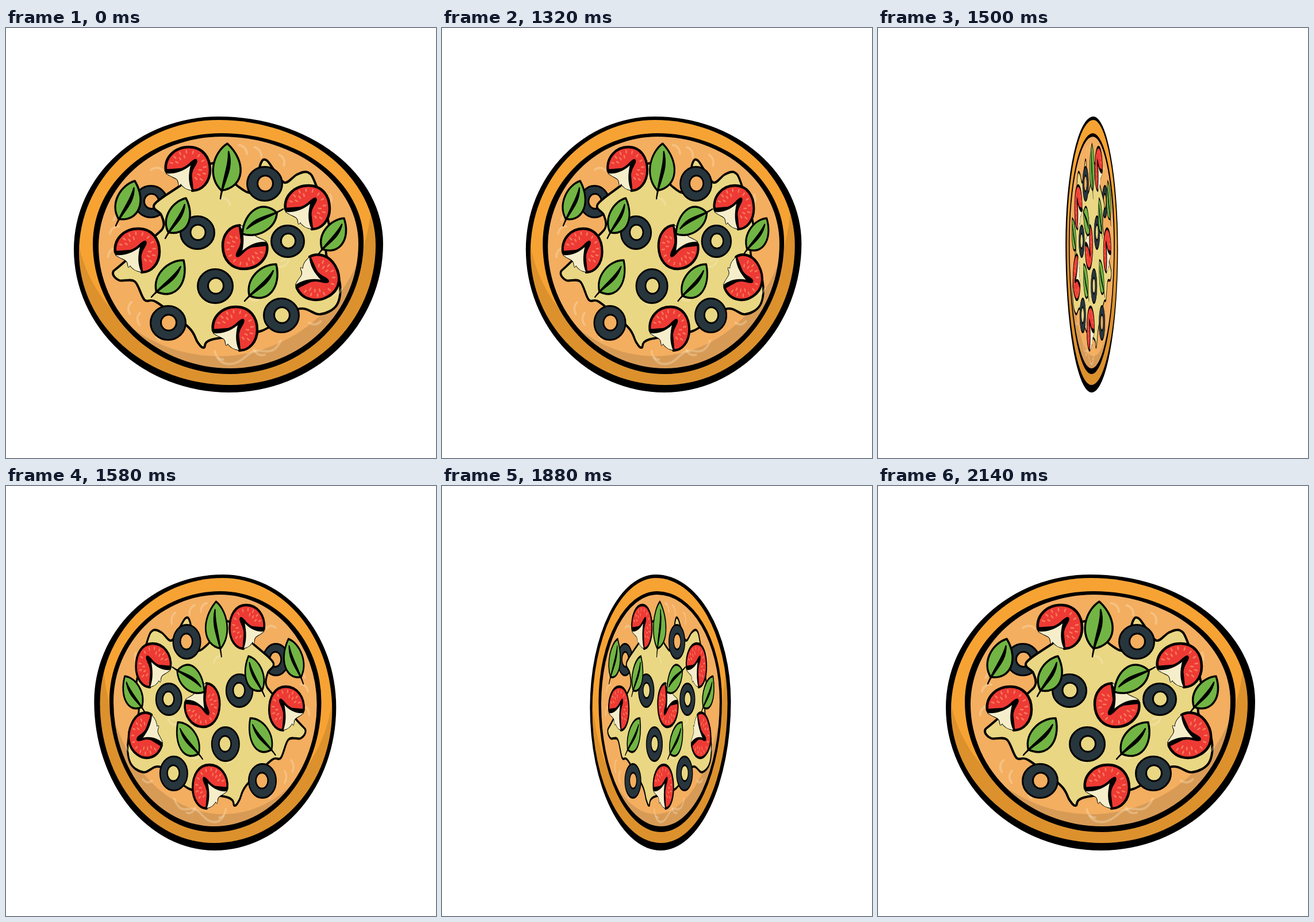
Animation, 748 px wide and 748 px high, one loop 2.98 s. Source, as an HTML page with a canvas:

```html
<!DOCTYPE html>
<html lang="en">
<head>
<meta charset="utf-8">
<title>Spinning pizza</title>
<style>
html, body { margin: 0; width: 100%; height: 100%; overflow: hidden; background: #fff; }
canvas { display: block; width: 748px; height: 748px; }
</style>
</head>
<body>
<canvas id="stage" width="748" height="748"></canvas>
<script>
const ctx = document.getElementById('stage').getContext('2d');
const LOOP = 2980, START = 1140, SPIN = 1020, STEP = 20, AXIS = 374;
const INK = '#000', DOUGH = '#f3ae60', CHEESE = '#e9d783', SHADE = 'rgba(0,0,0,.11)';
const RAD = Math.PI / 180;

// Four quarter ellipses joined at the top, right, bottom and left points
function egg([tx, ty], [rx, ry], [bx, by], [lx, ly]) {
  const p = new Path2D();
  p.ellipse(tx, ry, rx - tx, ry - ty, 0, -90 * RAD, 0);
  p.ellipse(bx, ry, rx - bx, by - ry, 0, 0, 90 * RAD);
  p.ellipse(bx, ly, bx - lx, by - ly, 0, 90 * RAD, 180 * RAD);
  p.ellipse(tx, ly, tx - lx, ly - ty, 0, 180 * RAD, 270 * RAD);
  p.closePath();
  return p;
}

// Closed Catmull-Rom curve through a few points
function blob(pts) {
  const n = pts.length, p = new Path2D();
  p.moveTo(...pts[0]);
  pts.forEach((b, i) => {
    const a = pts[(i + n - 1) % n], c = pts[(i + 1) % n], d = pts[(i + 2) % n];
    p.bezierCurveTo(b[0] + (c[0] - a[0]) / 6, b[1] + (c[1] - a[1]) / 6,
      c[0] - (d[0] - b[0]) / 6, c[1] - (d[1] - b[1]) / 6, ...c);
  });
  p.closePath();
  return p;
}

function paint(path, fill, width) {
  if (fill) { ctx.fillStyle = fill; ctx.fill(path); }
  if (width) { ctx.strokeStyle = INK; ctx.lineWidth = width; ctx.stroke(path); }
}

function local(x, y, turn, draw) {
  ctx.save();
  ctx.translate(x, y);
  ctx.rotate(turn);
  draw();
  ctx.restore();
}

const rim = egg([370, 154], [656, 375], [388, 634], [118, 385]);
const crust = egg([370, 160], [643, 378], [390, 621], [127, 390]);
const ring = egg([375, 183], [622, 372], [390, 602], [151, 375]);
const base = egg([375, 189], [613, 375], [390, 592], [161, 380]);
const light = egg([370, 60], [636, 290], [370, 571], [122, 330]);
const shade = new Path2D('M0 0H748V748H0Z');
shade.addPath(light);

const cheese = blob([[258, 307], [302, 275], [362, 235], [403, 275], [430, 284], [443, 236],
  [453, 230], [467, 248], [485, 269], [506, 255], [525, 251], [538, 270], [562, 343], [557, 394],
  [580, 440], [576, 481], [546, 498], [508, 489], [444, 527], [358, 542], [344, 556], [333, 546],
  [318, 521], [262, 477], [241, 473], [224, 441], [197, 439], [186, 426], [200, 412], [258, 363],
  [274, 345], [270, 325]]);
const wave = new Path2D('M368 574C380 590 400 586 414 574S434 560 448 562S470 560 478 544');

const olives = [[252, 302, 30, DOUGH], [450, 271, 32, DOUGH], [333, 356, 31, CHEESE],
  [490, 371, 30, CHEESE], [364, 449, 32, CHEESE], [282, 513, 32, DOUGH], [479, 500, 32, CHEESE]];
const tomatoes = [[316, 245, 0, 1], [524, 312, 0, 1], [228, 387, 0, 1], [398, 523, 0, 1],
  [416, 381, 178, 1], [540, 435, -30, -1]];
// Stem end and tip
const leaves = [[373, 297, 385, 201], [191, 344, 224, 266], [277, 366, 313, 296],
  [482, 315, 411, 358], [253, 468, 309, 404], [415, 475, 470, 411], [543, 394, 588, 331]];

const flesh = new Path2D('M-38 3C-41 -20 -22 -38 2 -38C26 -38 39 -20 39 2C39 23 25 38 8 38L4 0Z');
const pith = new Path2D('M-37 8C-24 9 -10 6 5 -6C1 10 1 24 7 37C-2 36 -8 32 -12 26C-15 30 -15 30 -16 25C-16 15 -26 16 -37 8Z');
const cleft = new Path2D('M-37 5C-22 5 -8 3 3 -7C8 -12 12 -15 14 -15C16 -13 12 -7 9 -2C4 8 3 22 8 37');

function drawOlive([x, y, r, inside]) {
  const body = new Path2D(), hole = new Path2D();
  body.ellipse(x, y, r - 1.5, r - 2.5, 0, 0, 360 * RAD);
  hole.ellipse(x + 1, y - 0.5, r * 0.42, r * 0.43, 0, 0, 360 * RAD);
  paint(body, '#27353d', 3);
  paint(hole, inside, 3);
}

function drawSeeds() {
  ctx.strokeStyle = '#f6795c';
  ctx.lineWidth = 2.6;
  ctx.beginPath();
  for (let i = 0; i < 20; i++) {
    const a = (200 + i * 11) * RAD, r = i % 2 ? 20 : 28;
    if (r < 24 && i > 6 && i < 14) continue;
    ctx.moveTo(r * Math.cos(a), r * Math.sin(a));
    ctx.lineTo((r + 4) * Math.cos(a), (r + 4) * Math.sin(a));
  }
  ctx.stroke();
}

function drawTomato([x, y, deg, flip]) {
  local(x, y, deg * RAD, () => {
    ctx.scale(1, flip);
    paint(flesh, '#ee3a34', 4.5);
    drawSeeds();
    paint(pith, '#f6eecb', 2);
    paint(cleft, INK, 4.5);
    paint(pith, '#f6eecb');
  });
}

function drawLeaf([sx, sy, tx, ty]) {
  const d = Math.hypot(tx - sx, ty - sy), foot = 0.15 * d;
  local(sx, sy, Math.atan2(ty - sy, tx - sx), () => {
    const body = new Path2D(), rib = new Path2D();
    body.moveTo(foot, 0);
    body.bezierCurveTo(0.26 * d, 0.41 * d, 0.72 * d, 0.39 * d, d, 0);
    body.bezierCurveTo(0.8 * d, -0.24 * d, 0.36 * d, -0.29 * d, foot, 0);
    body.closePath();
    paint(body, '#72b544', 3.5);
    rib.moveTo(0, 0);
    rib.bezierCurveTo(0.3 * d, 0, 0.55 * d, 0.18 * d, 0.86 * d, 0.04 * d);
    rib.bezierCurveTo(0.6 * d, 0.08 * d, 0.4 * d, 0, 0, 0);
    paint(rib, INK, 2.5);
  });
}

// Faint curls scattered by the golden angle
function drawCurls() {
  ctx.strokeStyle = 'rgba(255,238,205,.3)';
  ctx.lineWidth = 4;
  for (let i = 0; i < 26; i++) {
    const a = i * 137.5 * RAD, r = i % 3 ? 0.86 : 0.4;
    ctx.beginPath();
    ctx.arc(387 + 226 * r * Math.cos(a), 390 + 200 * r * Math.sin(a), 15, a, a + 1.5);
    ctx.stroke();
  }
  ctx.stroke(wave);
}

function drawShade(area) {
  ctx.save();
  ctx.clip(area);
  ctx.fillStyle = SHADE;
  ctx.fill(shade, 'evenodd');
  ctx.restore();
}

function drawPizza() {
  paint(rim, INK);
  paint(crust, '#f7a333');
  drawShade(crust);
  paint(ring, INK);
  paint(base, DOUGH);
  drawShade(base);
  drawOlive(olives[0]);
  paint(cheese, CHEESE, 4);
  drawCurls();
  olives.slice(1).forEach(drawOlive);
  tomatoes.forEach(drawTomato);
  leaves.forEach(drawLeaf);
}

// One full turn about the vertical axis with a sine ease
function widthAt(t) {
  const u = Math.min(1, Math.max(0, (t - START) / SPIN));
  return Math.cos(Math.PI * (1 - Math.cos(Math.PI * u)));
}

function frame(now) {
  const t = Math.floor((now % LOOP) / STEP) * STEP;
  const s = widthAt(t);
  ctx.setTransform(1, 0, 0, 1, 0, 0);
  ctx.fillStyle = '#fff';
  ctx.fillRect(0, 0, 748, 748);
  ctx.setTransform(s, 0, 0, 1, AXIS * (1 - s), 0);
  ctx.lineCap = ctx.lineJoin = 'round';
  drawPizza();
  requestAnimationFrame(frame);
}

frame(0);
</script>
</body>
</html>
```
